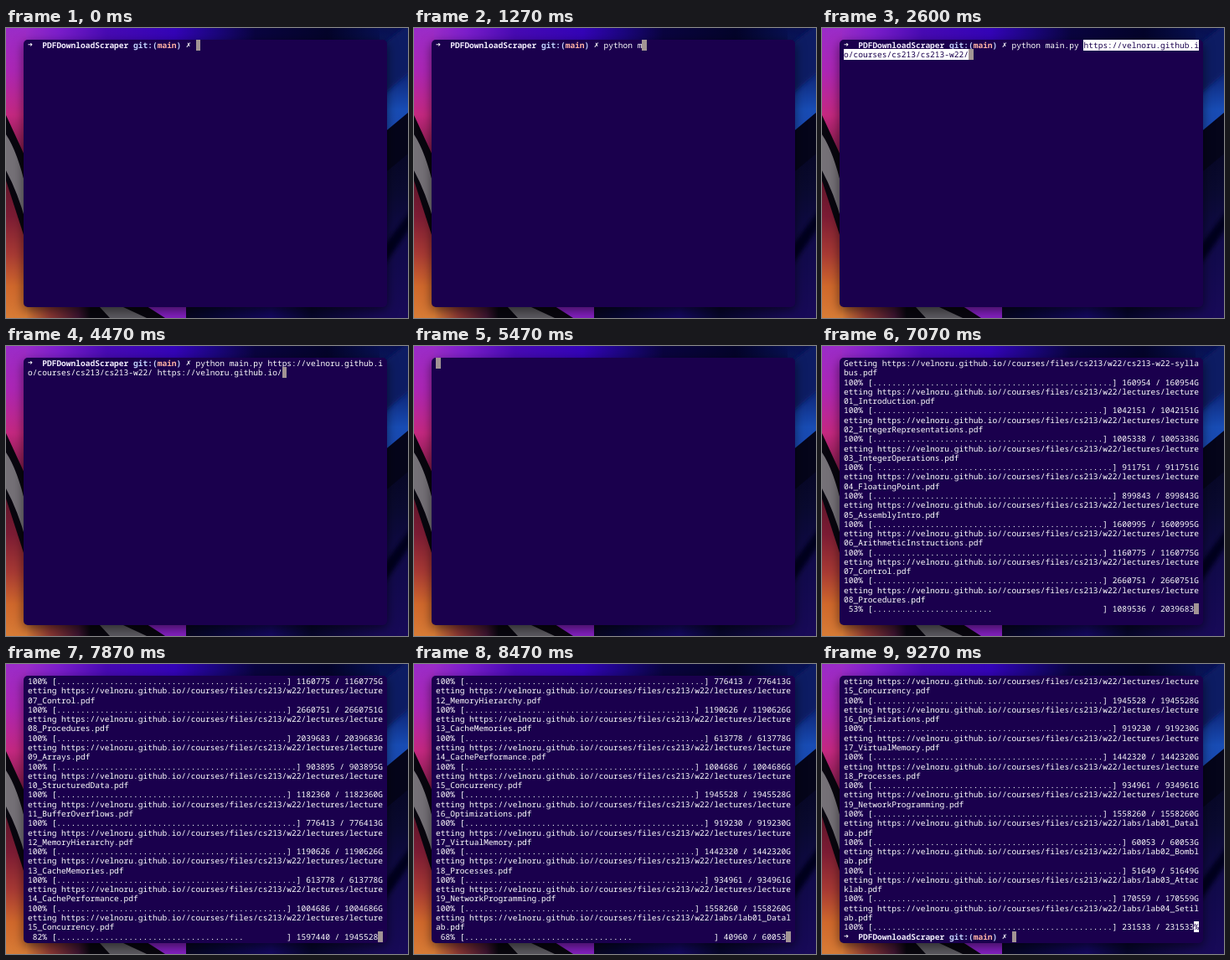
Write an HTML page that moves like this. It is 480x346 px and loops after 9470 ms.

```html
<!DOCTYPE html>
<html lang="en">
<head>
<meta charset="utf-8">
<title>Terminal download session</title>
<style>
html, body { margin: 0; width: 100%; height: 100%; overflow: hidden; background: #0a0a26; }
#stage { position: relative; width: 480px; height: 346px; overflow: hidden; }
#stage svg { position: absolute; inset: 0; }
#window {
  position: absolute; left: 21px; top: 14px; width: 434px; height: 319px;
  border-radius: 5px; background: #1a004d; overflow: hidden;
  box-shadow: 0 4px 13px rgba(0, 0, 0, .55);
}
#screen {
  position: absolute; left: 5px; top: 1px; margin: 0; color: #fff; white-space: pre;
  font: 500 9.56px/11.28px "Noto Sans Mono", "DejaVu Sans Mono", monospace;
  font-variant-ligatures: none; text-rendering: geometricPrecision;
}
b { font-weight: 700; }
.dir { color: #f4f0ff; }
.git { color: #c4d4ff; }
.branch { color: #ffb4a6; }
.icon {
  display: inline-block; width: 1ch; height: 11px; line-height: 11px; vertical-align: top;
  font-family: "DejaVu Sans Mono", monospace;
}
.mark { background: #fff; color: #1a004d; }
.cursor { background: #a29494; }
</style>
</head>
<body>
<div id="stage">
  <svg width="480" height="346" viewBox="0 0 480 346">
    <defs>
      <linearGradient id="top">
        <stop offset=".05" stop-color="#9a2cc8"/><stop offset=".13" stop-color="#7c1ecc"/>
        <stop offset=".25" stop-color="#480ab4"/><stop offset=".42" stop-color="#3404b8"/>
        <stop offset=".52" stop-color="#1c0680"/><stop offset=".62" stop-color="#0a0440"/>
        <stop offset=".8" stop-color="#04042a"/><stop offset=".93" stop-color="#081050"/>
      </linearGradient>
      <linearGradient id="left" x2="0" y2="1">
        <stop offset="0" stop-color="#9a2cc8"/><stop offset=".15" stop-color="#ac26b4"/>
        <stop offset=".3" stop-color="#c42880"/><stop offset=".5" stop-color="#5a1428"/>
        <stop offset=".65" stop-color="#7c1c34"/><stop offset=".78" stop-color="#a83a34"/>
        <stop offset=".89" stop-color="#d0682c"/><stop offset="1" stop-color="#d87c36"/>
      </linearGradient>
      <linearGradient id="bottom">
        <stop offset=".05" stop-color="#d87c36"/><stop offset=".11" stop-color="#8c3834"/>
        <stop offset=".18" stop-color="#3c1430"/><stop offset=".21" stop-color="#08060e"/>
        <stop offset=".38" stop-color="#08060e"/><stop offset=".5" stop-color="#06062e"/>
        <stop offset=".66" stop-color="#140860"/><stop offset=".76" stop-color="#06062a"/>
        <stop offset=".93" stop-color="#180a58"/>
      </linearGradient>
      <linearGradient id="right" x2="0" y2="1">
        <stop offset="0" stop-color="#081050"/><stop offset=".16" stop-color="#0e2678"/>
        <stop offset=".28" stop-color="#184cb4"/><stop offset=".36" stop-color="#1a48b0"/>
        <stop offset=".37" stop-color="#060620"/><stop offset=".56" stop-color="#0a0a30"/>
        <stop offset=".72" stop-color="#100a48"/><stop offset="1" stop-color="#180a58"/>
      </linearGradient>
      <filter id="soft"><feGaussianBlur stdDeviation="2.5"/></filter>
    </defs>
    <rect width="480" height="346" fill="#0a0a26"/>
    <rect width="480" height="170" fill="url(#top)"/>
    <rect y="320" width="480" height="26" fill="url(#bottom)"/>
    <rect width="24" height="346" fill="url(#left)"/>
    <rect x="446" width="34" height="346" fill="url(#right)"/>
    <path d="M0 104L24 156V256L0 182Z" fill="#08060e"/>
    <path d="M0 127Q14 148 24 192V232Q14 196 0 170Z" fill="#757177"/>
    <path d="M112 333H140L168 346H124Z" fill="#5c5a60"/>
    <path d="M165 330H215V346H190Z" fill="#8420c0"/>
    <path d="M450 126L480 101V150L450 175Z" fill="#05051a"/>
    <g filter="url(#soft)">
      <path d="M450 20L485 -8V50L450 80Z" fill="#0a1a64"/>
      <path d="M450 262L485 215V235L450 285Z" fill="#06061e"/>
    </g>
  </svg>
  <div id="window"><pre id="screen"></pre></div>
</div>
<script>
const LOOP = 9470, FPS = 15, COLS = 74, ROWS = 28, CHUNK = 8192;
const PASTE = 2300, SPACE = 3100, PASTE_AGAIN = 3700, SLASH = 4300;
const ENTER = 4850, CLEAR = 5100, DONE = 8900;

const site = 'https://velnoru.github.io';
const typed = 'python main.py ';
const page = site + '/courses/cs213/cs213-w22/';
const lectures = ('Introduction IntegerRepresentations IntegerOperations FloatingPoint AssemblyIntro ' +
  'ArithmeticInstructions Control Procedures Arrays StructuredData BufferOverflows MemoryHierarchy ' +
  'CacheMemories CachePerformance Concurrency Optimizations VirtualMemory Processes NetworkProgramming').split(' ');
const labs = ['Data', 'Bomb', 'Attack', 'Seti'];
const pad = i => String(i + 1).padStart(2, '0');
const files = [
  'cs213-w22-syllabus',
  ...lectures.map((name, i) => `lectures/lecture${pad(i)}_${name}`),
  ...labs.map((name, i) => `labs/lab${pad(i)}_${name}lab`)
];
const sizes = [
  160954, 1042151, 1005338, 911751, 899843, 1600995, 1160775, 2660751,
  2039683, 903895, 1182360, 776413, 1190626, 613778, 1004686, 1945528,
  919230, 1442320, 934961, 1558260, 60053, 51649, 170559, 231533
];

// Time against number of files fetched
const pace = [[5750, 0], [6200, 2.001], [7066, 8.5305], [7866, 15.817], [8850, 24]];

const span = (cls, text) => `<span class="${cls}">${text}</span>`;
const cursor = span('cursor', ' ');
const prompt = '<b>' + span('icon', '➜') + '  ' + span('dir', 'PDFDownloadScraper') + ' ' +
  span('git', 'git:(') + span('branch', 'main') + span('git', ')') + ' ' + span('icon', '✗') + '</b> ';
const promptWidth = 35;

function fetched(t) {
  const k = pace.findIndex(([time]) => t < time);
  if (k < 0) return files.length;
  const [t0, p0] = pace[k - 1], [t1, p1] = pace[k];
  return p0 + (p1 - p0) * (t - t0) / (t1 - t0);
}

function bar(size, part) {
  const now = part >= 1 ? size : Math.floor(part * size / CHUNK) * CHUNK;
  const total = String(size);
  const count = String(now).padStart(total.length) + ' / ' + total;
  const room = COLS - 9 - count.length;
  const dots = '.'.repeat(Math.floor(now / size * room)).padEnd(room);
  const percent = Math.floor(100 * now / size) + '%';
  return `${percent.padStart(4)} [${dots}] ${count}`;
}

function command(t) {
  let text = typed, from = 0, to = 0;
  const paste = url => { from = text.length; text += url; to = text.length; };
  const key = ch => { text += ch; from = to = 0; };
  if (t < PASTE) {
    const part = Math.min(1, Math.max(0, (t - 500) / 1300));
    text = typed.slice(0, Math.floor(part * typed.length));
  } else {
    paste(page);
    if (t >= SPACE) key(' ');
    if (t >= PASTE_AGAIN) paste(site);
    if (t >= SLASH) key('/');
  }
  const split = COLS - promptWidth;
  const run = (a, b) => {
    const lo = Math.min(b, Math.max(a, from)), hi = Math.max(lo, Math.min(b, to));
    const mid = text.slice(lo, hi);
    return text.slice(a, lo) + (mid && span('mark', mid)) + text.slice(hi, b);
  };
  const end = text.length;
  const shown = end > split ? run(0, split) + '\n' + run(split, end) : run(0, end);
  return prompt + shown + (t >= ENTER ? '\n' : '') + cursor;
}

function output(t) {
  if (t < pace[0][0]) return cursor;
  const p = fetched(t);
  const text = files.slice(0, Math.floor(p) + 1).map((file, i) =>
    `Getting ${site}//courses/files/cs213/w22/${file}.pdf\n${bar(sizes[i], Math.min(1, p - i))}`).join('');
  const lines = text.split('\n').flatMap(line => line.match(new RegExp(`.{1,${COLS}}`, 'g')));
  if (t >= DONE) {
    lines[lines.length - 1] += span('mark', '%');
    lines.push(prompt);
  }
  return lines.slice(-ROWS).join('\n') + cursor;
}

const screen = document.getElementById('screen');
const start = performance.now();
let last;
function draw() {
  const now = (performance.now() - start) % LOOP;
  const t = Math.floor((now + 2) * FPS / 1000) * 1000 / FPS;
  const html = t < CLEAR ? command(t) : output(t);
  if (html !== last) screen.innerHTML = last = html;
  requestAnimationFrame(draw);
}
draw();
</script>
</body>
</html>
```
